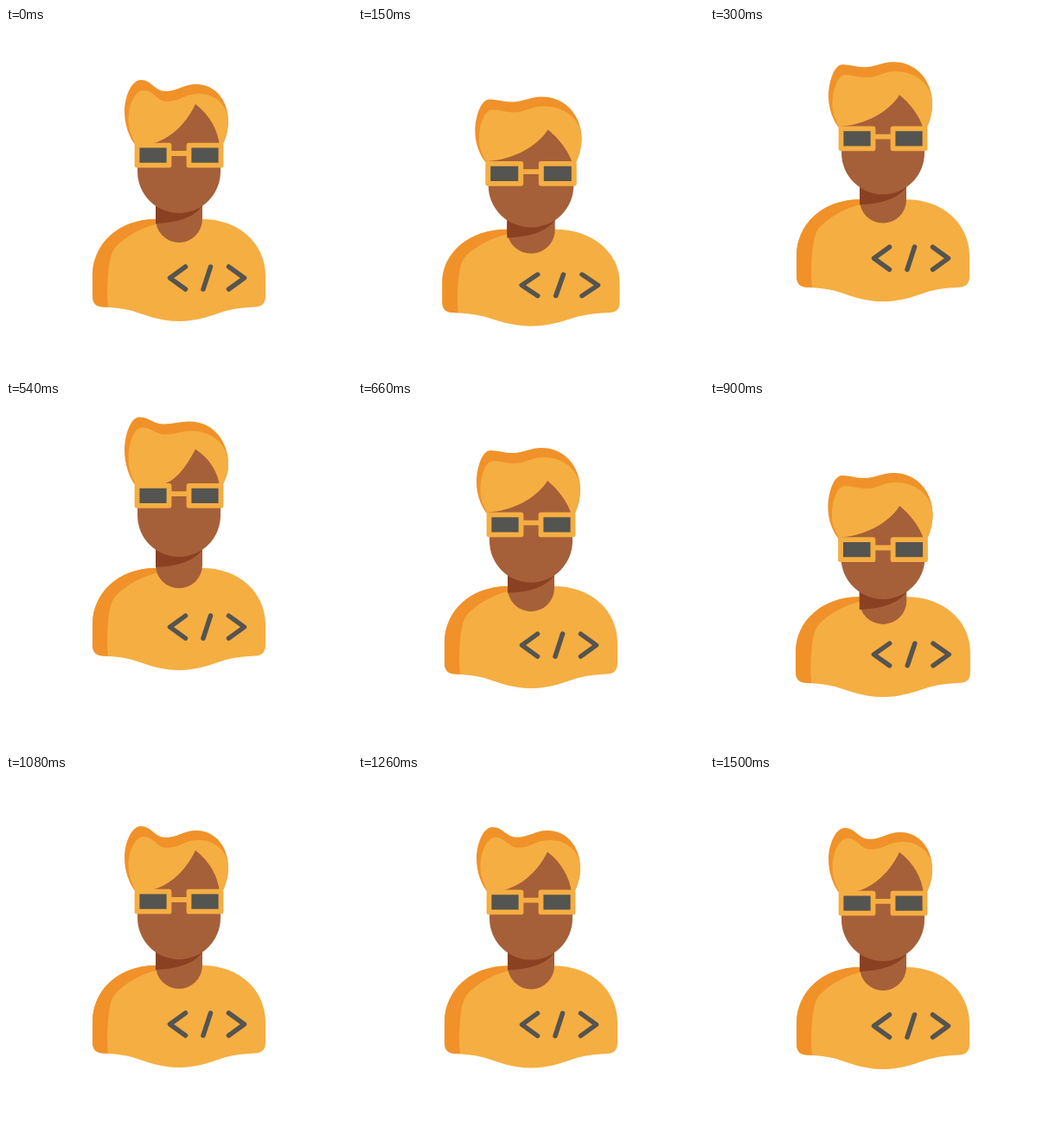
Animation, 400 px wide and 400 px high, one loop 1530 ms. Source, as an HTML page:

```html
<!DOCTYPE html>
<html lang="en">
<head>
<meta charset="utf-8">
<title>Jumping developer</title>
<style>
html, body { margin: 0; width: 100%; height: 100%; overflow: hidden; background: #fff; }
svg { display: block; width: 100%; height: 100%; }
.light { fill: #f5ae42; }
.dark { fill: #f09229; }
.skin { fill: #a56039; }
.shade { fill: #8a4122; }
.code { fill: none; stroke: #545450; stroke-width: 5.5; stroke-linecap: round; stroke-linejoin: round; }
.frame { fill: #545450; stroke: #f5ae42; stroke-width: 5.8; stroke-linejoin: round; }
</style>
</head>
<body>
<svg viewBox="0 0 400 400">
  <g id="body">
    <path class="light" d="M173 221H227C270 221 300 250 300 286V310Q300 322 288 322.500C278 323 266 324 254 327C238 332 222 339 200 339C178 339 162 332 146 327C134 324 122 323 112 322.500Q100 322 100 310V286C100 250 130 221 173 221Z"/>
    <path class="dark" d="M178 221H173C130 221 100 250 100 286V310Q100 322 112 322.500L118 322.700Q116 306 118 285C120 264 122 257 131 249C145 237 161 229 178 226Z"/>
    <path class="code" d="M207.500 276L189.500 289L207.500 302M236.500 276L228 302M257.500 276L275.500 289L257.500 302"/>
  </g>
  <g id="head">
    <path id="neck" class="skin"/>
    <path id="shade" class="shade" d="M173 190H227V206C216 220 196 225 173 226Z"/>
    <path id="hairBack" class="dark"/>
    <path id="hair" class="light"/>
    <path id="face" class="skin"/>
    <path id="glasses" class="frame" d="M151.500 135.700H188.500V158.700H151.500ZM211.500 135.700H248.500V158.700H211.500ZM190 145H210"/>
  </g>
</svg>
<script>
const LOOP = 1530, STEP = 30, GRAVITY = 1.37;
const NECK = 0.4, CHIN = 0.63, EYES = 1;   // looseness: the body is 0
const parts = {};
document.querySelectorAll('[id]').forEach(node => { parts[node.id] = node; });

const set = (id, name, value) => parts[id].setAttribute(name, value);
const clamp = v => Math.max(0, Math.min(1, v));
const smooth = u => u * u * (3 - 2 * u);
const fall = (u, bend) => smooth(u ** bend);
const rise = (u, bend) => 1 - fall(1 - u, bend);

// Crouch, leap, landing, rebound; looser parts lag and swing further.
function jump(t, loose) {
  const poses = [
    [0, 0],
    [125 + 40 * loose, 7 + 15 * loose],
    [440 + 10 * loose, -33 - 11 * loose],
    [765 + 35 * loose, 7 + 27 * loose],
    [1080, -2],
    [LOOP, 0]
  ];
  const i = poses.findIndex(p => p[0] > t);
  const [t0, y0] = poses[i - 1], [t1, y1] = poses[i];
  const bend = t > poses[3][0] ? GRAVITY - 0.37 * loose : GRAVITY;
  const ease = y1 < y0 ? rise : fall;
  return y0 + (y1 - y0) * ease((t - t0) / (t1 - t0), bend);
}

// Hair outline; a shift of the top edge gives the lighter inner layer.
function hairPath(flat, tall, inset) {
  const bent = flat + tall;
  const side = [137 + 4.5 * inset, 97 + 1.5 * (flat - tall) + 9 * inset];
  const tuft = [156 - 3 * flat - 2 * tall + 3 * inset, 60 + 1.5 * flat - 3.5 * tall + 12 * inset];
  const dip = [184 - 6 * flat - 2 * tall + 2 * inset, 73 - 8.5 * bent + 12 * inset];
  const crown = [220 - 8 * bent + 2 * inset, 65 - 6.5 * flat - 3.5 * tall + 11 * inset];
  const end = 107 + 3 * tall - flat;
  const wave = ([x0, y0], [x1, y1]) => {
    const h = (x1 - x0) * 0.42;
    return `C${x0 + h} ${y0} ${x1 - h} ${y1} ${x1} ${y1}`;
  };
  return `M150 136C${side[0] + 5} 126 ${side[0]} ${side[1] + 14} ${side}`
    + `C${side[0]} ${(side[1] + tuft[1]) / 2} ${tuft[0] - (tuft[0] - side[0]) * 0.55} ${tuft[1]} ${tuft}`
    + wave(tuft, dip) + wave(dip, crown)
    + `C${crown[0] + (257 - crown[0]) * 0.65} ${crown[1]} 257 ${end - (end - crown[1]) * 0.48} 257 ${end}`
    + `C257 ${end + 11} 254 128 250 136Z`;
}

// Face with the fringe cut into the forehead; chin is its offset from the eyes.
function facePath(flat, tall, chin) {
  const part = 88 + 8.5 * flat + 5.5 * tall;
  const tipX = 161 - 10 * flat + 16 * tall, tipY = 135 - 2 * flat;
  const drop = tipY - part, jaw = 166 + chin;
  return `M219 ${part}C${236 - 5 * flat} ${part + drop * 0.27} ${245 - 3 * flat} ${part + drop * 0.65} 247 136`
    + `L248 147V${jaw}A48 48 0 0 1 152 ${jaw}V147L${tipX} ${tipY}`
    + `C${tipX + (219 - tipX) * 0.42} ${tipY - drop * 0.05} 207 ${part + drop * 0.54} 219 ${part}Z`;
}

function draw(t) {
  const body = jump(t, 0), chin = jump(t, CHIN), eyes = jump(t, EYES);
  const neck = 221 + jump(t, NECK);
  const squash = Math.max(0, body) * 0.0045;
  const lag = eyes - body;
  const flat = clamp(lag / 2.5), tall = clamp(-lag / 10);

  set('body', 'transform', `translate(200 ${339 + body}) scale(${1 + squash} ${1 - 2 * squash}) translate(-200 -339)`);
  set('head', 'transform', `translate(200 0) scale(${1 + squash} 1) translate(-200 0)`);
  set('neck', 'd', `M173 ${190 + chin}V${neck}A27 27 0 0 0 227 ${neck}V${190 + chin}Z`);
  set('shade', 'transform', `translate(0 ${chin})`);
  for (const id of ['hairBack', 'hair', 'face', 'glasses']) set(id, 'transform', `translate(0 ${eyes})`);
  set('hairBack', 'd', hairPath(flat, tall, 0));
  set('hair', 'd', hairPath(flat, tall, 1));
  set('face', 'd', facePath(flat, tall, chin - eyes));
}

const start = performance.now();
function tick() {
  const t = (performance.now() - start) % LOOP;
  draw(Math.floor(t / STEP) * STEP);
  requestAnimationFrame(tick);
}
tick();
</script>
</body>
</html>
```
